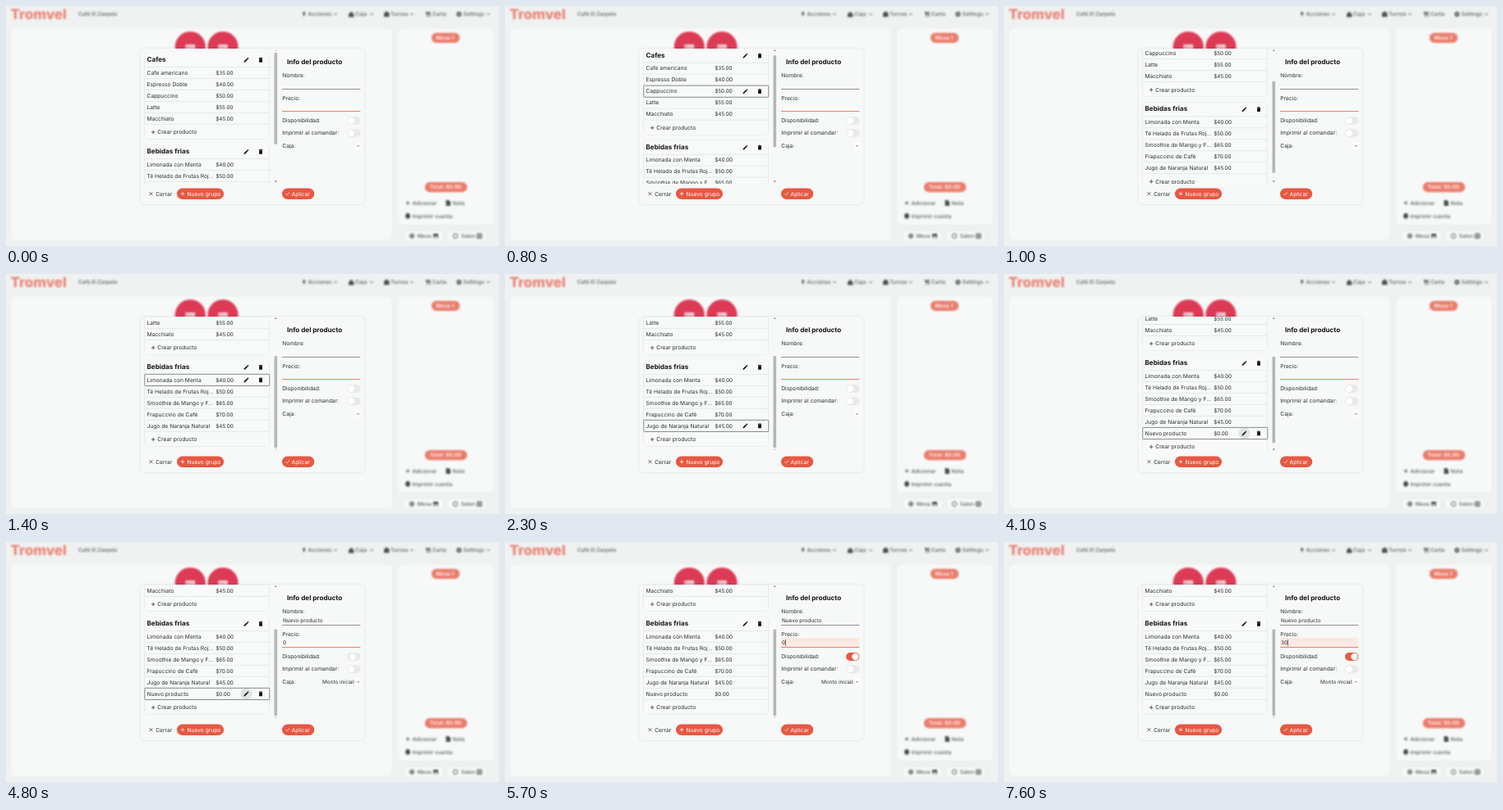
An HTML page that plays this animation: 600x293 px, repeating every 8 s.

```html
<!DOCTYPE html>
<html lang="es">
<head>
<meta charset="utf-8">
<title>Editor de productos</title>
<style>
html, body { margin: 0; width: 100%; height: 100%; overflow: hidden; background: #f0f2f2; }
svg { display: block; width: 100vw; height: 100vh; }
text { font-family: Inter, "Open Sans", sans-serif; font-size: 6.7px; fill: #2c2e30; text-rendering: geometricPrecision; white-space: pre; }
.bold { font-weight: 700; font-size: 8.1px; fill: #151515; }
.num { font-size: 6.4px; }
.white { fill: #fff; }
.back { filter: blur(1px); }
.back text { fill: #55585a; font-weight: 500; font-size: 6.5px; }
.back .logo { font-size: 17px; font-weight: 800; fill: #e98475; }
.back .badge { font-weight: 700; fill: #fdebe7; }
.back .tag { font-weight: 700; font-size: 3.4px; fill: #b06a76; }
.panel { fill: #f6f9f8; filter: drop-shadow(0 .5px 1px #0001); }
.modal { fill: #f6f9f7; filter: drop-shadow(0 .5px 1.2px #0002); }
.card { fill: #f7faf8; filter: drop-shadow(0 .8px .6px #0003); }
.line { stroke: #dfe2e1; stroke-width: .7; }
.ink { fill: none; stroke: #333; stroke-width: .75; }
.gray { fill: none; stroke: #55585a; stroke-width: 1; }
</style>
</head>
<body>
<svg id="stage" viewBox="0 0 600 293" preserveAspectRatio="none">
  <defs>
    <clipPath id="view"><rect x="164" y="52.3" width="160" height="164.7"/></clipPath>
  </defs>
</svg>
<script>
const LOOP = 8000, STEP = 100;
const RED = '#e75843';
const VIEW = 165, TRACK_TOP = 57, TRACK = 155, ROW = 14;

const stage = document.getElementById('stage');

function el(parent, tag, attrs = {}, content) {
  const node = document.createElementNS('http://www.w3.org/2000/svg', tag);
  set(node, attrs);
  if (content !== undefined) node.textContent = content;
  parent.appendChild(node);
  return node;
}
function set(node, attrs) {
  for (const key in attrs) node.setAttribute(key, attrs[key]);
}
const show = (node, on) => { node.style.display = on ? '' : 'none'; };
const text = (p, x, mid, str, cls = '') => el(p, 'text', { x, y: mid + 2.3, class: cls }, str);
const box = (p, x, y, width, height, rx, attrs) => el(p, 'rect', { x, y, width, height, rx, ...attrs });
const path = (p, d, attrs) => el(p, 'path', { d, ...attrs });
const line = (p, x1, x2, y, attrs) => el(p, 'line', { x1, x2, y1: y, y2: y, ...attrs });
const disc = (p, cx, cy, r, attrs) => el(p, 'circle', { cx, cy, r, ...attrs });

const plus = (p, x, y, attrs) => path(p, `M${x - 2.3} ${y}h4.6M${x} ${y - 2.3}v4.6`, attrs);
const chevron = (p, x, y, s, attrs) => path(p, `M${x - s} ${y - s / 2}l${s} ${s}l${s} ${-s}`, attrs);

const PENCIL = 'M3 17.3V21h3.7L17.8 9.9l-3.7-3.7zM20.7 7a1 1 0 000-1.4l-2.3-2.3a1 1 0 00-1.4 0l-1.9 1.8 3.8 3.8z';
const TRASH = 'M6 19a2 2 0 002 2h8a2 2 0 002-2V7H6zM19 4h-3.5l-1-1h-5l-1 1H5v2h14z';
function tools(p, y) {
  const g = el(p, 'g', { fill: '#111' });
  path(g, PENCIL, { transform: `translate(292.5 ${y}) scale(.32) translate(-12 -12)` });
  path(g, TRASH, { transform: `translate(310 ${y}) scale(.32) translate(-12 -12)` });
  return g;
}

// Blurred page behind the dialog
function drawPage() {
  const g = el(stage, 'g', { class: 'back' });
  const dark = { fill: '#4c4f51' };
  box(g, 6, 27, 464, 259, 5, { class: 'panel' });
  box(g, 477, 27, 117, 240, 5, { class: 'panel' });

  text(g, 5.5, 13.6, 'Tromvel', 'logo');
  text(g, 88, 10, 'Café El Zarpelo');
  path(g, 'M362 7h2l-.8 2.200h1.600l-3 4 .6-3h-1.600z', dark);
  text(g, 367.5, 10, 'Acciones');
  path(g, 'M418.300 7.500h3.700v2h1.500v4h-6.500v-4h1.300z', dark);
  text(g, 425.3, 10, 'Caja');
  path(g, 'M460 8.200h1.800v-1.400h2.900v1.400h1.800v5h-6.500z', dark);
  text(g, 468, 10, 'Turnos');
  path(g, 'M511.500 7v2.500h2.500v-2.500M512.700 7v6.500M516 13.500v-6.500q-1.500 1-1.200 3.800h1', { class: 'gray' });
  text(g, 519, 10, 'Carta');
  disc(g, 551.3, 10, 2, { class: 'gray', style: 'stroke-width:2' });
  text(g, 556.5, 10, 'Settings');
  for (const x of [401, 445, 494, 587]) chevron(g, x, 10, 1.8, { class: 'gray' });

  [224.3, 264].forEach((x, i) => {
    disc(g, x, 49.8, 18.6, { fill: '#dc3a55' });
    box(g, x - 6, 47, 12, 5.5, 1, { fill: '#f8dfe3' });
    el(g, 'text', { x, y: 51, class: 'tag', 'text-anchor': 'middle' }, 'Mesa ' + (i + 1));
  });

  box(g, 517.8, 32.7, 34.4, 12.3, 6.1, { fill: '#ea7d6c' });
  text(g, 523.5, 39, 'Mesa 1', 'badge');
  box(g, 509.8, 215, 51.4, 12.3, 6.1, { fill: '#ea7d6c' });
  text(g, 515.5, 221, 'Total: $0.00', 'badge');

  plus(g, 489, 240.5, { class: 'gray' });
  text(g, 494.5, 240.5, 'Adicionar');
  path(g, 'M535.500 237h3.500l2 2v5h-5.500z', dark);
  text(g, 543.5, 240.5, 'Nota');
  path(g, 'M487 253h4v2h1v3h-1v1.500h-4v-1.500h-1v-3h1z', dark);
  text(g, 494.5, 256.3, 'Imprimir cuenta');

  for (const [x, name] of [[484, 'Mesa'], [537, 'Salon']]) {
    box(g, x, 274.5, 48, 12.5, 6.2, { class: 'panel' });
    disc(g, x + 10, 280.7, 2.7, { class: 'gray' });
    text(g, x + 16.7, 280.7, name);
  }
  disc(g, 494, 280.7, 1.5, dark);
  path(g, 'M520 278h6v3h-6zM520.500 281h1.300v2.700h-1.300zM524.300 281h1.300v2.700h-1.300z', dark);
  path(g, 'M573.500 278h5.500v5.500h-5.500zM573.500 280.800h5.500M576.200 278v5.500', { class: 'gray' });
}

// Product groups
const menu = [
  ['Cafes', [['Cafe americano', 35], ['Espresso Doble', 40], ['Cappuccino', 50], ['Latte', 55], ['Macchiato', 45]]],
  ['Bebidas frias', [['Limonada con Menta', 40], ['Té Helado de Frutas Roj...', 50], ['Smoothie de Mango y F...', 65],
    ['Frapuccino de Café', 70], ['Jugo de Naranja Natural', 45], ['Nuevo producto', 0]]]
];
const NEW = 10;
const rowMids = [];

function drawGroup(p, [name, items], top) {
  const card = box(p, 168.5, top, 152, 105.5, 5, { class: 'card' });
  text(p, 171.5, top + 8.8, name, 'bold');
  tools(p, top + 8.9);
  line(p, 169, 320.5, top + 17.5, { class: 'line' });
  let last;
  items.forEach(([label, price], i) => {
    const mid = top + 24.4 + i * ROW;
    last = el(p, 'g');
    text(last, 171.5, mid, label);
    text(last, 255.2, mid, `$${price.toFixed(2)}`, 'num');
    line(last, 169, 320.5, mid + 7, { class: 'line' });
    rowMids.push(mid);
  });
  const foot = el(p, 'g');
  plus(foot, 179.2, top + 97, { class: 'ink' });
  text(foot, 184.3, top + 97, 'Crear producto');
  return { card, last, foot };
}

drawPage();
box(stage, 163.5, 52, 273, 190, 5, { class: 'modal' });

const list = el(el(stage, 'g', { 'clip-path': 'url(#view)' }), 'g');
drawGroup(list, menu[0], 57);
const drinks = drawGroup(list, menu[1], 169);

const hover = el(list, 'g');
const halo = disc(hover, 292.5, 0, 7, { fill: '#e0e3e2' });
box(hover, 168.8, -7.1, 152, 14.2, 1, { fill: 'none', stroke: '#606365', 'stroke-width': .7 });
tools(hover, 0);

// Scrollbar
const thumb = box(stage, 326.5, 0, 3.6, 0, 0, { fill: '#b4b7b6' });
const upArrow = path(stage, 'M326.900 54.800h2.700l-1.350-1.600z');
const downArrow = path(stage, 'M326.900 213.600h2.700l-1.350 1.600z');

// Buttons
path(stage, 'M174.500 227.200l4 4M178.500 227.200l-4 4', { class: 'ink' });
text(stage, 182.2, 229.2, 'Cerrar');
box(stage, 208, 222.5, 57, 13.5, 6.7, { fill: RED });
plus(stage, 215, 229.2, { fill: 'none', stroke: '#fff', 'stroke-width': .75 });
text(stage, 220.4, 229.2, 'Nuevo grupo', 'white');
box(stage, 336, 222.5, 39.2, 13.5, 6.7, { fill: RED });
path(stage, 'M340.500 229.300l1.400 1.400l3.200-3.200', { fill: 'none', stroke: '#fff', 'stroke-width': .75 });
text(stage, 347.6, 229.2, 'Aplicar', 'white');

// Form
text(stage, 342, 68.4, 'Info del producto', 'bold');
[['Nombre:', 85], ['Precio:', 112.3], ['Disponibilidad:', 140], ['Imprimir al comandar:', 155], ['Caja:', 170.5]]
  .forEach(([label, y]) => text(stage, 336.3, y, label));
const focusFill = box(stage, 336, 117, 95.3, 11.5, 0, { fill: '#fbe8e4' });
line(stage, 336, 431.3, 101.5, { stroke: '#666', 'stroke-width': .7 });
line(stage, 336, 431.3, 128.6, { stroke: RED, 'stroke-width': .8 });
const nameValue = text(stage, 337, 95.6, 'Nuevo producto', 'num');
const priceValue = text(stage, 337, 122.9, '', 'num');
const caret = box(stage, 337, 119, .6, 8, 0, { fill: '#222' });

function toggle(y) {
  const track = box(stage, 415, y - 5, 16.4, 10, 5);
  const knob = disc(stage, 0, y, 4.2, { fill: '#fff', style: 'filter:drop-shadow(0 .3px .4px #0003)' });
  return on => {
    set(track, { fill: on > .4 ? RED : '#e7eae9' });
    set(knob, { cx: 420 + on * 6.4 });
  };
}
const available = toggle(140);
toggle(155.2)(0);
box(stage, 425, 166.7, 6.8, 8, 1, { fill: '#fff' });
chevron(stage, 428.4, 170.8, 1.2, { class: 'ink' });
const boxValue = text(stage, 385, 170.5, 'Monto inicial:', 'num');

// Timeline
const ramp = (t, a, b) => Math.min(1, Math.max(0, (t - a) / (b - a)));
const smooth = p => p * p * (3 - 2 * p);
const cubic = p => p < .5 ? 4 * p ** 3 : 1 - 4 * (1 - p) ** 3;
const at = (t, keys) => keys.reduce((v, [start, value]) => t >= start ? value : v, keys[0][1]);

const pointer = [[0, 0], [500, 82], [600, 95], [700, 104], [1400, 129.5], [1500, 151], [1600, 171.5], [2300, 185.5], [2900, 203]];
const price = [[0, ''], [4800, '0'], [7000, ''], [7400, '3'], [7600, '30']];
const blink = [[0, false], [5700, true], [6300, false], [6900, true]];

function hovered(t, scroll) {
  if (t >= 3500) return t < 5100 ? NEW : -1;
  if (t >= 2900) return -1;
  const y = at(t, pointer) + scroll;
  return rowMids.findIndex((mid, i) => i !== NEW && Math.abs(mid - y) <= 7);
}

function render(t) {
  const added = t >= 3300, edited = t >= 4800;
  const scroll = 64 * cubic(ramp(t, 650, 1200)) + 14 * smooth(ramp(t, 3900, 4400));
  const extra = added ? ROW : 0;
  const content = VIEW + 64 + extra;

  set(list, { transform: `translate(0 ${-scroll})` });
  set(drinks.card, { height: 105.5 + extra });
  set(drinks.foot, { transform: `translate(0 ${extra})` });
  show(drinks.last, added);

  const row = hovered(t, scroll);
  show(hover, row >= 0);
  if (row >= 0) set(hover, { transform: `translate(0 ${rowMids[row]})` });
  show(halo, t >= 3800);

  set(thumb, { y: TRACK_TOP + TRACK * scroll / content, height: TRACK * VIEW / content });
  set(upArrow, { fill: scroll > 0 ? '#555' : '#bbb' });
  set(downArrow, { fill: scroll < content - VIEW - .1 ? '#555' : '#bbb' });

  show(nameValue, edited);
  show(boxValue, edited);
  available(smooth(ramp(t, 4700, 5000)));

  show(focusFill, t >= 5700);
  const typed = at(t, price);
  priceValue.textContent = typed;
  show(caret, at(t, blink));
  set(caret, { x: 337 + (typed ? priceValue.getComputedTextLength() : 0) });
}

const start = performance.now();
function tick() {
  const t = (performance.now() - start) % LOOP;
  render(Math.floor(t / STEP) * STEP);
  requestAnimationFrame(tick);
}
tick();
</script>
</body>
</html>
```
